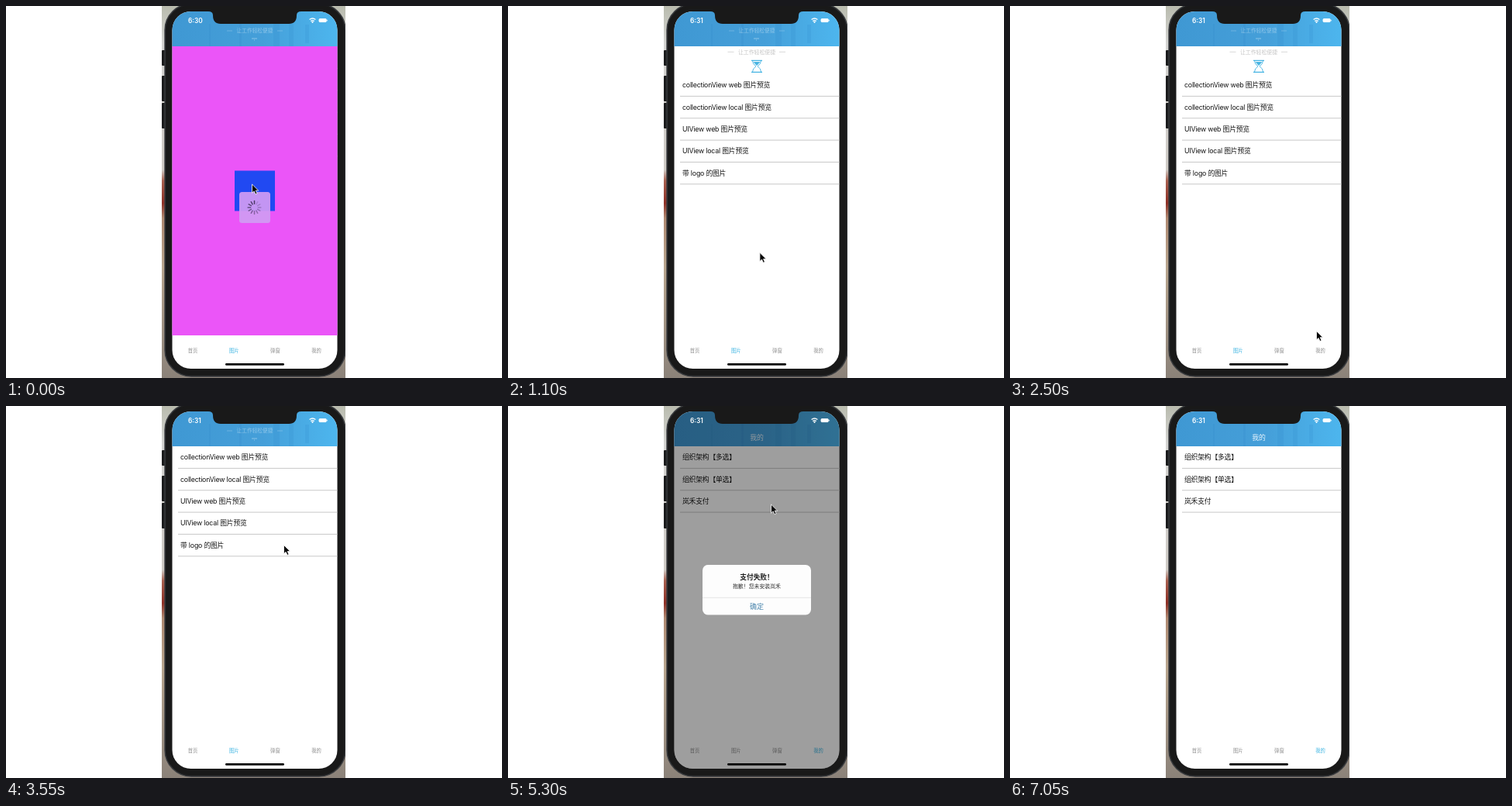
An HTML page for the animation above (7.1 s loop, 640x480 px).

```html
<!DOCTYPE html>
<html lang="zh-CN">
<head>
<meta charset="utf-8">
<style>
  html, body { margin: 0; width: 100%; height: 100%; overflow: hidden; background: #fff; }
  svg { display: block; width: 640px; height: 480px; }
  text { font-family: Inter, "Noto Sans CJK SC", "Noto Sans CJK", sans-serif; }
  .row { font-size: 8.8px; letter-spacing: -.2px; fill: #151515; }
  .rule { stroke: #c2c2c2; stroke-width: .9; }
  .tab { font-size: 6.3px; text-anchor: middle; }
  .mid { text-anchor: middle; }
</style>
</head>
<body>
<svg viewBox="0 0 640 480">
  <defs>
    <linearGradient id="sky">
      <stop offset="0" stop-color="#3f98d3"/><stop offset=".55" stop-color="#459fd9"/><stop offset="1" stop-color="#4db6ee"/>
    </linearGradient>
    <linearGradient id="desk" x2="0" y2="1">
      <stop offset="0" stop-color="#b9bbae"/><stop offset=".1" stop-color="#d4d4d2"/><stop offset=".44" stop-color="#cfcbc6"/>
      <stop offset=".47" stop-color="#a8604f"/><stop offset=".53" stop-color="#8e3026"/><stop offset=".57" stop-color="#b08a72"/>
      <stop offset=".7" stop-color="#b9a68f"/><stop offset="1" stop-color="#8b8279"/>
    </linearGradient>
    <clipPath id="stage"><rect x="201" width="237" height="480"/></clipPath>
    <clipPath id="screen"><rect x="214.5" y="7" width="213" height="461" rx="24"/></clipPath>
    <clipPath id="body"><rect x="214" y="52" width="214" height="420"/></clipPath>
  </defs>
  <g clip-path="url(#stage)">
    <rect x="201" width="237" height="480" fill="url(#desk)"/>
    <g fill="#1b1c1d">
      <rect x="201" y="57" width="6" height="20" rx="1"/>
      <rect x="201" y="90" width="6" height="33" rx="1"/>
      <rect x="201" y="125" width="6" height="33" rx="1"/>
      <rect x="205" y="-3" width="233" height="481" rx="34" stroke="#3b3d40" stroke-width="1.4"/>
      <rect x="207" y="-1" width="229" height="477" rx="32" fill="#191919"/>
    </g>
    <g clip-path="url(#screen)">
      <rect x="214" y="7" width="214" height="462" fill="#fff"/>
      <rect x="214" y="7" width="214" height="45" fill="url(#sky)"/>
      <g fill="#2f86c4" opacity=".16">
        <rect x="262" y="23" width="2" height="29"/><rect x="301" y="23" width="3" height="29"/>
        <rect x="345" y="23" width="8" height="29"/><rect x="365" y="23" width="6" height="29"/>
        <rect x="386" y="24" width="5" height="24"/>
      </g>
      <g id="pictures">
        <g opacity=".5" fill="#d5ecfa" stroke="#d5ecfa">
          <text class="mid" x="321" y="34.3" font-size="6.7" stroke="none">让工作轻松便捷</text>
          <path d="M285 32h7M350 32h7" stroke-width=".6"/>
          <path d="M317 42h7M320.5 43.5v1" stroke-width="1"/>
        </g>
        <g clip-path="url(#body)">
          <g id="list">
            <text class="mid" x="321" y="25.5" font-size="6.9" fill="#c6c6c6">让工作轻松便捷</text>
            <path d="M283.500 23.300h8M350 23.300h8" stroke="#cfcfcf" stroke-width=".8"/>
            <g stroke="#43b3e2" fill="none" stroke-width=".9">
              <path d="M314 34.300h14M314 49.300h14" stroke-width="1.300"/>
              <path d="M315.500 34.500q0 4.500 4.500 7.300q-4.500 2.800 -4.500 7.300M326.500 34.500q0 4.500 -4.500 7.300q4.500 2.800 4.500 7.300"/>
              <path d="M317.300 36.600h7.400l-3.700 4z" fill="#43b3e2"/>
            </g>
          </g>
        </g>
      </g>
      <g id="mine">
        <text class="mid" x="321" y="44.300" font-size="8.900" fill="#e8f4fc">我的</text>
      </g>
      <g id="preview">
        <rect x="214" y="52" width="214" height="373" fill="#eb55f8"/>
        <rect x="295" y="212.500" width="52" height="52" fill="#2149f2"/>
        <rect x="301" y="240" width="40" height="40" rx="3.500" fill="#d09bf4" opacity=".93"/>
        <g id="spinner" stroke="#4c3a66" stroke-width="1.500" stroke-linecap="round"></g>
      </g>
      <g id="tabs"></g>
      <rect id="dim" x="214" y="7" width="214" height="462"/>
      <g id="alert">
        <rect x="251" y="205" width="140" height="64.500" rx="7" fill="#fdfdfd"/>
        <text class="mid" x="321" y="224" font-size="8.700" font-weight="700" fill="#222">支付失败！</text>
        <text class="mid" x="321" y="234.500" font-size="6.900" font-weight="500" fill="#333">抱歉！您未安装岚禾</text>
        <path d="M251 247.300h140" stroke="#dcdcdc" stroke-width=".7"/>
        <text class="mid" x="321" y="262" font-size="9" font-weight="500" fill="#4a86ad">确定</text>
      </g>
      <rect x="283" y="461" width="76" height="2.800" rx="1.400" fill="#080808"/>
    </g>
    <path d="M261 6H381V7q-6 0-6 5q0 11-10 11H277q-10 0-10-11q0-5-6-5z" fill="#191919"/>
    <text id="clock" x="235" y="21.800" font-size="8.300" font-weight="600" fill="#fff"></text>
    <g fill="none" stroke="#fff" stroke-width="1.300">
      <path d="M391.600 17.600q3.900-3.200 7.800 0M393.200 19.500q2.300-1.800 4.600 0"/>
      <circle cx="395.500" cy="20.800" r=".5"/>
      <rect x="404" y="16.600" width="9.300" height="4" rx="1" fill="#fff" stroke-width=".9"/>
      <path d="M414.600 17.800v1.600" stroke-width=".8"/>
    </g>
    <g id="pointer">
      <circle id="touch" r="15" fill="none" stroke="#0a0a0a" stroke-width="2.500"/>
      <path d="M0 0V11.200L2.600 8.800L4.500 12.900L6.500 12L4.700 8.100H8.200Z" fill="#050505" stroke="#fff" stroke-width=".8"/>
    </g>
  </g>
</svg>
<script>
const LOOP = 7100, ROW = 28.35;
const $ = id => document.getElementById(id);

function add(parent, tag, attrs, text = "") {
  const node = document.createElementNS("http://www.w3.org/2000/svg", tag);
  for (const key in attrs) node.setAttribute(key, attrs[key]);
  node.textContent = text;
  parent.append(node);
  return node;
}

function addRows(parent, labels) {
  labels.forEach((label, i) => {
    add(parent, "text", { class: "row", x: 225, y: 69.4 + i * ROW }, label);
    add(parent, "line", { class: "rule", x1: 222, x2: 428, y1: 80.4 + i * ROW, y2: 80.4 + i * ROW });
  });
}

addRows($("list"), ["collectionView web 图片预览", "collectionView local 图片预览",
  "UIView web 图片预览", "UIView local 图片预览", "带 logo 的图片"]);
addRows($("mine"), ["组织架构【多选】", "组织架构【单选】", "岚禾支付"]);
const mineRules = $("mine").querySelectorAll("line");

const tabs = ["首页", "图片", "弹窗", "我的"].map((label, i) =>
  add($("tabs"), "text", { class: "tab", x: 241 + i * 53.2, y: 447.4 }, label));

const spokes = Array.from({ length: 12 }, (_, i) =>
  add($("spinner"), "path", { d: "M0-4.8V-8.4", transform: `translate(320.5 260) rotate(${i * 30})` }));

// Each key is [time, ...values]; values ease from one key to the next.
const pull = [[0, 0], [350, 0], [650, 66.5], [800, 66.5], [1050, 36], [2650, 36], [2950, 0]];
const path = [[0, 317.5, 230], [150, 317.5, 230], [350, 312, 180], [650, 312.5, 297.5], [850, 312.5, 298],
  [1900, 398.5, 439], [2300, 398.5, 439], [3500, 358.5, 179.5], [3700, 358.5, 179.5],
  [4200, 400, 440], [4400, 400, 440], [4950, 339.5, 127], [5300, 339.5, 127],
  [5700, 333.5, 253], [6150, 333.5, 253], [6850, 352, 490]];
const shade = [[4980, 0], [5200, .38], [5760, .38], [5960, .075], [6050, 0]];
const fade = [[200, 1], [350, 0]];
const taps = [[0, 0], [380, 820], [4220, 4340], [4900, 5010], [5690, 5790]];

function at(keys, t) {
  const next = keys.findIndex(key => key[0] > t);
  if (next < 0) return keys[keys.length - 1].slice(1);
  if (next === 0) return keys[0].slice(1);
  const a = keys[next - 1], b = keys[next];
  const u = (t - a[0]) / (b[0] - a[0]), ease = u * u * (3 - 2 * u);
  return a.slice(1).map((v, i) => v + (b[i + 1] - v) * ease);
}

const show = (node, visible) => node.setAttribute("display", visible ? "inline" : "none");
const opacity = (node, value) => node.setAttribute("opacity", value);

function draw(t) {
  const mine = t >= 4300;
  const [dim] = at(shade, t), [cover] = at(fade, t), [offset] = at(pull, t), [x, y] = at(path, t);
  const clearing = t > 5860 && t < 6050;

  show($("pictures"), !mine);
  show($("mine"), mine);
  $("list").setAttribute("transform", `translate(0 ${offset})`);
  opacity($("preview"), cover);
  show($("preview"), cover > 0);
  spokes.forEach((spoke, i) => opacity(spoke, 1 - .8 * ((Math.floor(t / 80) + 12 - i) % 12) / 11));

  tabs.forEach((tab, i) => tab.setAttribute("fill", i === (mine ? 3 : 1) ? "#3fb5e2" : "#8e8e8e"));
  opacity($("tabs"), clearing ? .65 : 1);
  mineRules.forEach(rule => opacity(rule, clearing ? 0 : 1));

  opacity($("dim"), dim);
  opacity($("alert"), Math.max(0, (dim - .08) / .3));
  $("clock").textContent = t < 300 ? "6:30" : "6:31";
  $("pointer").setAttribute("transform", `translate(${x} ${y})`);
  show($("touch"), taps.some(([from, to]) => t >= from && t < to));
}

const start = performance.now();
function tick(now) {
  draw(Math.max(0, now - start) % LOOP);
  requestAnimationFrame(tick);
}
draw(0);
requestAnimationFrame(tick);
</script>
</body>
</html>
```
